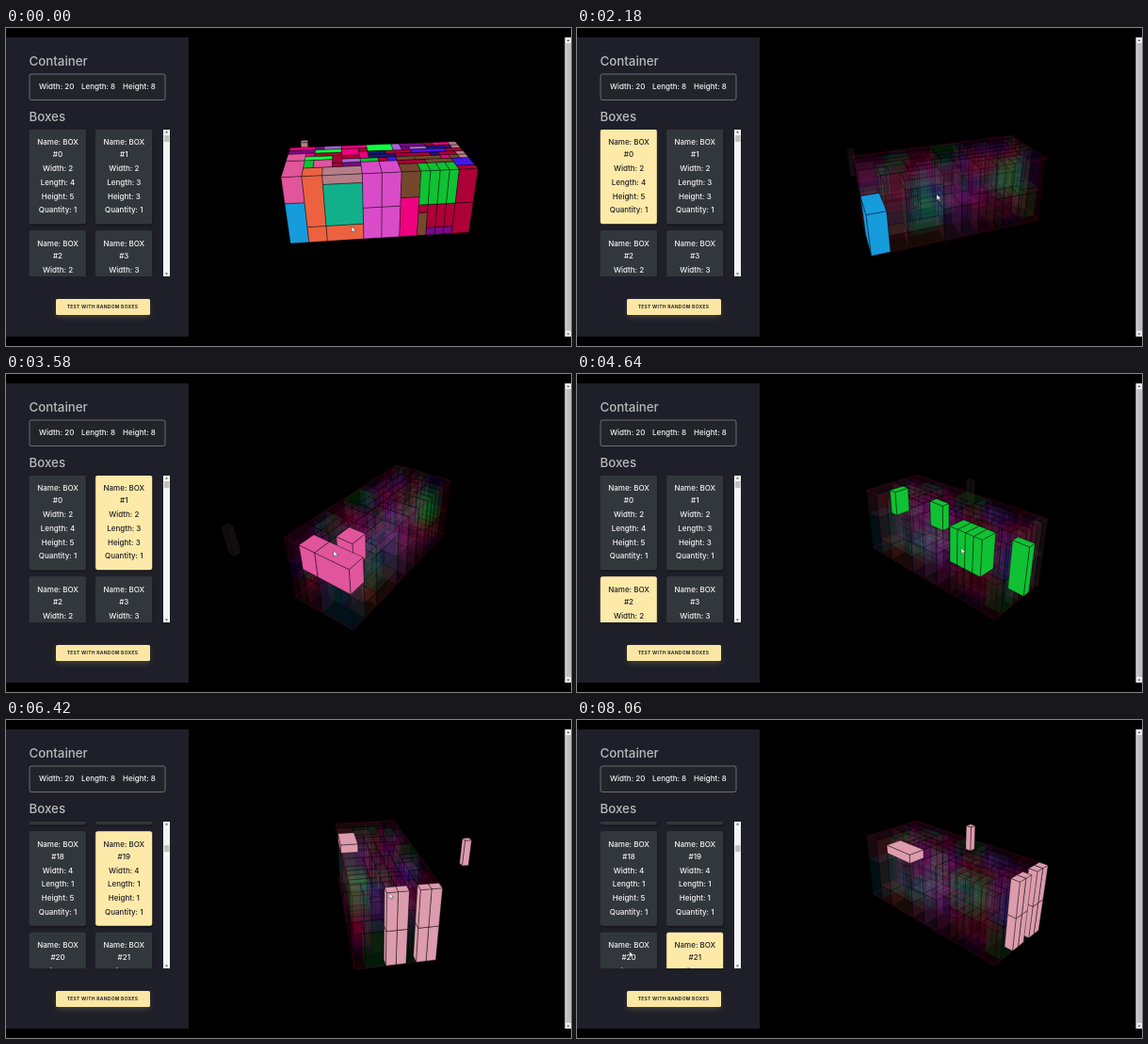
An HTML page with a canvas that plays this animation: 600x338 px, repeating every 8.09 s.

```html
<!DOCTYPE html>
<html lang="en">
<head>
<meta charset="utf-8">
<title>Box packing</title>
<style>
  html, body { margin: 0; width: 100%; height: 100%; overflow: hidden; background: #000; }
  canvas, svg { position: absolute; left: 0; top: 0; width: 600px; height: 338px; }
  text { font-family: Inter, "Open Sans", sans-serif; font-weight: 550; font-size: 8px; fill: #f4f4f4; }
  .heading { font-size: 13.3px; font-weight: 500; fill: #b9babd; }
  .card text { text-anchor: middle; }
  .card rect { fill: #32373b; stroke: #3b4145; stroke-width: .5; }
  .card.on rect { fill: #fdeaa8; stroke: #fdeaa8; }
  .card.on text { fill: #1e1f28; }
  .button { font-size: 5px; font-weight: 700; letter-spacing: .25px; fill: #2a2b36; text-anchor: middle; }
</style>
</head>
<body>
<canvas id="scene" width="600" height="338"></canvas>
<svg viewBox="0 0 600 338">
  <defs>
    <clipPath id="listClip"><rect x="20" y="108" width="146" height="156"/></clipPath>
    <filter id="soft" x="-20%" y="-50%" width="140%" height="220%"><feGaussianBlur stdDeviation="3"/></filter>
  </defs>
  <rect y="10" width="194" height="318" fill="#1e1f28"/>
  <text class="heading" x="24.5" y="39.5">Container</text>
  <rect x="25" y="49" width="144" height="27.5" rx="2" fill="#212429" stroke="#8e8f92" stroke-width=".7"/>
  <text x="35" y="64.5">Width: 20</text>
  <text x="80" y="64.5">Length: 8</text>
  <text x="124" y="64.5">Height: 8</text>
  <text class="heading" x="24.5" y="98.5">Boxes</text>
  <g clip-path="url(#listClip)"><g id="list"></g></g>
  <rect x="167" y="108" width="7" height="156" fill="#f4f4f4"/>
  <path d="M169 111.5h3l-1.5 -2zM169 260.5h3l-1.5 2z" fill="#555"/>
  <rect id="thumb" x="168" width="5.5" height="7" fill="#c1c1c1"/>
  <rect x="54" y="291" width="98" height="16" rx="2" fill="#fbe7a3" opacity=".2" filter="url(#soft)"/>
  <rect x="53" y="288" width="100" height="17" rx="1.5" fill="#fbe7a3"/>
  <text class="button" x="102.5" y="298.3">TEST WITH RANDOM BOXES</text>
  <rect x="593.5" y="10" width="6.5" height="318" fill="#f1f1f1"/>
  <rect x="594.5" y="16" width="5.5" height="306" fill="#c1c1c1"/>
  <path d="M595.5 14h3l-1.5 -2zM595.5 324.5h3l-1.5 2z" fill="#555"/>
  <path id="cursor" d="M0 0v6l1.5 -1.3 1 2.2 1 -.5 -1 -2.1h2z" fill="#fff" stroke="#222" stroke-width=".4"/>
</svg>
<script>
const LOOP = 8090, FOCAL = 375, DISTANCE = 41, CENTER = [395, 171.5];
const SIZE = [20, 8, 8];
const COLORS = {
  blue: '#169bdc', pink: '#e0559b', green: '#10c134', orange: '#ec6240', teal: '#12b08a',
  orchid: '#d84cc8', magenta: '#ee0080', brown: '#75482e', crimson: '#ad0038', lime: '#10ff40',
  indigo: '#4418e8', purple: '#7a0a86', rose: '#b47e88', navy: '#1c1670', lilac: '#a765d6'
};
const ROSE_LIT = '#dc9cae';

// Each pose of a drag, and each card that is clicked between drags
const POSES = [
  { at: 0, azimuth: -6, tilt: 28, hand: [367, 211] },
  { at: 1180, azimuth: 62, tilt: 28, hand: [316, 209] },
  { at: 2180, azimuth: -20, tilt: 28, hand: [382, 177] },
  { at: 3580, azimuth: -55, tilt: 36, hand: [348, 188] },
  { at: 4640, azimuth: 44, tilt: 28, hand: [408, 185] },
  { at: 6420, azimuth: 80, tilt: 27, hand: [407, 184] },
  { at: 7300, azimuth: 44, tilt: 28, hand: [400, 185] }
];
const CLICKS = [
  { at: 1740, card: 0, color: 'blue' },
  { at: 2900, card: 1, color: 'pink' },
  { at: 4250, card: 2, color: 'green' },
  { at: 6000, card: 19, color: 'rose' },
  { at: 7600, card: 21, color: 'rose' },
  { at: LOOP, card: 20, color: 'rose' }
];

const clamp = (v, low, high) => Math.min(high, Math.max(low, v));
const ease = k => k * k * (3 - 2 * k);
const scrollAt = time => 957 * ease(clamp((time - 5100) / 600, 0, 1));
const cardPosition = n => [25 + n % 2 * 70.3, 108 + Math.floor(n / 2) * 107.5];

function clickPoint({ at, card }) {
  const [x, y] = cardPosition(card);
  return [x + 30, Math.min(y - scrollAt(at) + 50, 246)];
}

const cameraKeys = POSES.map(p => [p.at, p.azimuth, p.tilt]);
const pointerKeys = [...POSES.map(p => [p.at, ...p.hand]), ...CLICKS.map(c => [c.at, ...clickPoint(c)])]
  .sort((a, b) => a[0] - b[0]);

function sample(keys, time) {
  const next = keys.findIndex(key => key[0] > time);
  if (next < 0) return keys[keys.length - 1].slice(1);
  const from = keys[next - 1], to = keys[next];
  const k = ease((time - from[0]) / (to[0] - from[0]));
  return from.slice(1).map((v, i) => v + (to[i + 1] - v) * k);
}

let seed = 11;
const random = () => (seed = seed * 16807 % 2147483647) / 2147483647;
const pick = list => list[Math.floor(random() * list.length)];

const boxes = [], taken = new Set();
const farCorner = (min, size) => min.map((v, i) => v + size[i]);

function cells(min, size) {
  const out = [], max = farCorner(min, size);
  for (let x = min[0]; x < max[0]; x++)
    for (let y = min[1]; y < max[1]; y++)
      for (let z = min[2]; z < max[2]; z++) out.push(x + 20 * (y + 8 * z));
  return out;
}

const fits = (min, size) => farCorner(min, size).every((v, i) => v <= SIZE[i]) &&
  cells(min, size).every(cell => !taken.has(cell));

function place(color, min, size) {
  boxes.push({ color, min, max: farCorner(min, size) });
  cells(min, size).forEach(cell => taken.add(cell));
}

// Layers read "color:height" from the floor up
function column(x, z, width, depth, layers) {
  let y = 0;
  for (const layer of layers.split(' ')) {
    const [color, height] = layer.split(':');
    place(color, [x, y, z], [width, +height, depth]);
    y += +height;
  }
}

let frontX = 0, sideZ = 7;
function front(width, depth, layers, repeat = 1) {
  for (; repeat--; frontX += width) column(frontX, 8 - depth, width, depth, layers);
}
function side(width, depth, layers, repeat = 1) {
  for (; repeat--;) column(20 - depth, sideZ -= width, depth, width, layers);
}

function packRest() {
  const palette = ['crimson', 'purple', 'indigo', 'navy', 'brown', 'crimson', 'purple', 'lime',
    'magenta', 'lilac', 'crimson', 'teal'];
  for (let y = 0; y < 8; y++)
    for (let z = 0; z < 8; z++)
      for (let x = 0; x < 20; x++) {
        const min = [x, y, z], size = [1, 1, 1];
        if (!fits(min, size)) continue;
        [pick([2, 3, 4]), pick([2, 3, 4]), pick([1, 2])].forEach((goal, axis) => {
          while (size[axis] < goal) {
            size[axis]++;
            if (!fits(min, size)) { size[axis]--; break; }
          }
        });
        place(pick(palette), min, size);
      }
}

front(2, 4, 'blue:5 pink:3');
front(2, 2, 'orange:2 orange:6');
front(4, 2, 'orange:2 teal:5 rose:1');
front(2, 3, 'orchid:4 orchid:4', 2);
front(2, 2, 'magenta:5 brown:3');
front(1, 2, 'brown:3 crimson:1 green:4');
front(1, 2, 'purple:1 crimson:3 green:4', 3);
front(2, 1, 'crimson:4 crimson:4');
side(2, 2, 'lime:4 indigo:4');
side(1, 1, 'rose:4 rose:4', 2);
side(1, 2, 'green:6 crimson:2');
side(1, 1, 'rose:4 rose:4', 2);
place('pink', [0, 5, 2], [2, 3, 2]);
place('pink', [3, 5, 4], [2, 3, 2]);
place('green', [2, 5, 4], [1, 3, 2]);
place('green', [8, 5, 4], [2, 3, 1]);
packRest();
boxes.unshift({ color: 'rose', min: [0, .8, -11.3], max: [1, 4.8, -10.3], outside: true });

const ctx = document.getElementById('scene').getContext('2d');
ctx.lineJoin = 'round';

function makeCamera(azimuth, tilt) {
  const a = azimuth * Math.PI / 180, p = tilt * Math.PI / 180;
  const ca = Math.cos(a), sa = Math.sin(a), cp = Math.cos(p), sp = Math.sin(p);
  return {
    eye: [DISTANCE * cp * sa + 10, DISTANCE * sp + 4, DISTANCE * cp * ca + 4],
    project([gx, gy, gz]) {
      const x = gx - 10, y = gy - 4, z = gz - 4;
      const forward = x * sa + z * ca;
      const scale = FOCAL / (DISTANCE - y * sp - forward * cp);
      return [CENTER[0] + (x * ca - z * sa) * scale, CENTER[1] - (y * cp - forward * sp) * scale];
    }
  };
}

function face(box, axis, value) {
  const u = (axis + 1) % 3, v = (axis + 2) % 3;
  return [[0, 0], [1, 0], [1, 1], [0, 1]].map(([i, j]) => {
    const point = [];
    point[axis] = value;
    point[u] = (i ? box.max : box.min)[u];
    point[v] = (j ? box.max : box.min)[v];
    return point;
  });
}

function visibleFaces(box, eye) {
  const faces = [];
  for (let axis = 0; axis < 3; axis++) {
    if (eye[axis] > box.max[axis]) faces.push([axis, box.max[axis]]);
    else if (eye[axis] < box.min[axis]) faces.push([axis, box.min[axis]]);
  }
  return faces;
}

function trace(points, camera) {
  ctx.beginPath();
  points.forEach(point => ctx.lineTo(...camera.project(point)));
  ctx.closePath();
}

function drawBox(box, camera, fill, alpha, edge, shellOnly) {
  for (const [axis, value] of visibleFaces(box, camera.eye)) {
    if (shellOnly && value !== 0 && value !== SIZE[axis]) continue;
    trace(face(box, axis, value), camera);
    ctx.globalAlpha = alpha;
    ctx.fillStyle = fill;
    ctx.fill();
    ctx.globalAlpha = edge;
    ctx.strokeStyle = '#000';
    ctx.stroke();
  }
}

const eyeDistance = (box, eye) =>
  Math.hypot(...eye.map((e, i) => e - (box.min[i] + box.max[i]) / 2));

function drawScene(camera, selected) {
  ctx.globalAlpha = 1;
  ctx.fillStyle = '#000';
  ctx.fillRect(0, 0, 600, 338);
  ctx.lineWidth = .5;
  if (!selected) {
    boxes.forEach(box => drawBox(box, camera, COLORS[box.color], 1, .75, !box.outside));
    return;
  }
  const sorted = boxes.map(box => [eyeDistance(box, camera.eye), box])
    .sort((a, b) => b[0] - a[0]).map(entry => entry[1]);
  for (const box of sorted)
    if (box.color !== selected) drawBox(box, camera, COLORS[box.color], .1, .4);
  ctx.globalAlpha = .45;
  ctx.strokeStyle = '#c8103c';
  for (const y of [0, 8]) {
    trace(face({ min: [0, 0, 0], max: SIZE }, 1, y), camera);
    ctx.stroke();
  }
  const lit = selected === 'rose' ? ROSE_LIT : COLORS[selected];
  for (const box of sorted)
    if (box.color === selected) drawBox(box, camera, lit, 1, .8);
}

const NS = 'http://www.w3.org/2000/svg';
function add(parent, tag, attributes, content = '') {
  const node = document.createElementNS(NS, tag);
  for (const name in attributes) node.setAttribute(name, attributes[name]);
  node.textContent = content;
  return parent.appendChild(node);
}

const list = document.getElementById('list');
const cards = Array.from({ length: 24 }, (_, n) => {
  const [x, y] = cardPosition(n);
  const width = Math.min(4, 2 + Math.floor(n / 3));
  const length = Math.max(1, 4 - n);
  const height = n % 2 ? Math.max(1, 3 - Math.floor(n / 9)) : 5;
  add(list, 'rect', { x: x + .5, y: y + 1, width: 60.5, height: 101, rx: 2, fill: '#15161b' });
  const card = add(list, 'g', { class: 'card' });
  add(card, 'rect', { x, y, width: 59.7, height: 100, rx: 2 });
  const lines = ['Name: BOX', '#' + n, 'Width: ' + width, 'Length: ' + length, 'Height: ' + height, 'Quantity: 1'];
  lines.forEach((line, i) =>
    add(card, 'text', { x: x + 30, y: y + (i ? 14.4 + i * 14.8 : 16) }, line));
  return card;
});

const thumb = document.getElementById('thumb'), cursor = document.getElementById('cursor');

function render(time) {
  const { card: active, color } = CLICKS.filter(click => click.at <= time).pop() || {};
  drawScene(makeCamera(...sample(cameraKeys, time)), color);
  const scroll = scrollAt(time);
  list.setAttribute('transform', `translate(0 ${-scroll})`);
  thumb.setAttribute('y', 114 + scroll * .02);
  cards.forEach((card, n) => card.classList.toggle('on', n === active));
  cursor.setAttribute('transform', `translate(${sample(pointerKeys, time)})`);
}

const start = performance.now();
function tick() {
  render((performance.now() - start) % LOOP);
  requestAnimationFrame(tick);
}
tick();
</script>
</body>
</html>
```
